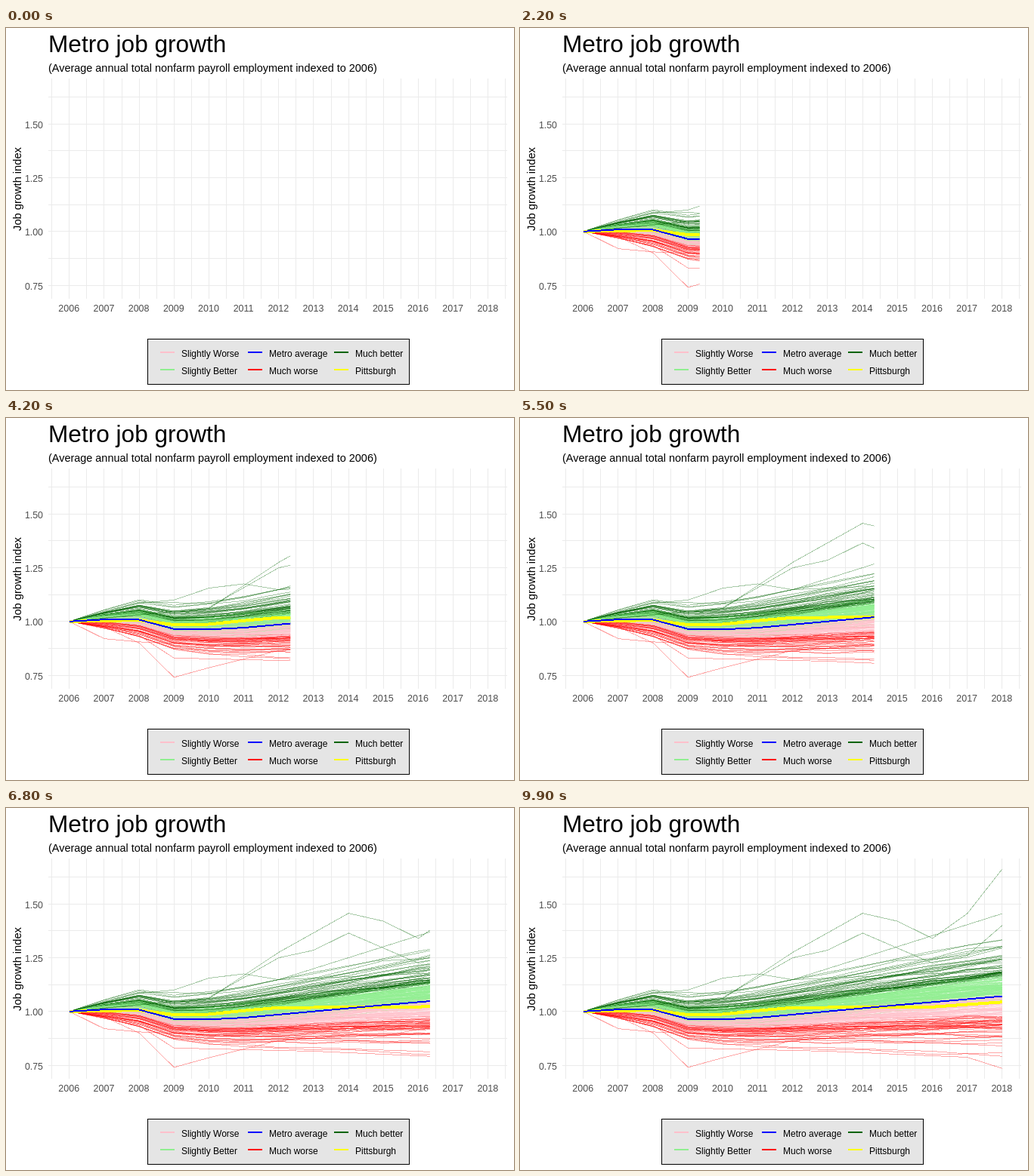
Write an HTML page that moves like this. It is 672 px wide and 480 px high and loops after 10 s.

```html
<!DOCTYPE html>
<html lang="en">
<head>
<meta charset="utf-8">
<title>Metro job growth</title>
<style>
  html, body { margin: 0; width: 100%; height: 100%; overflow: hidden; background: #fff; }
  svg { display: block; width: 672px; height: 480px; font-family: "Liberation Sans", Arial, sans-serif; }
  .crisp { shape-rendering: crispEdges; fill: none; }
</style>
</head>
<body>
<svg id="stage" viewBox="0 0 672 480">
  <defs><clipPath id="reveal"><rect id="window" x="83" y="60" width="0" height="300"/></clipPath></defs>
</svg>
<script>
const stage = document.getElementById('stage');
const revealWindow = document.getElementById('window');
const YEARS = 12, STEP_MS = 100, STEPS = 100, LAST_STEP = 79;
const xOf = year => 83.78 + year * 46.17;
const yOf = index => 269.8 - (index - 1) * 285;

function add(parent, tag, attrs, text) {
  const node = document.createElementNS('http://www.w3.org/2000/svg', tag);
  for (const key in attrs) node.setAttribute(key, attrs[key]);
  if (text) node.textContent = text;
  parent.appendChild(node);
  return node;
}
const label = (text, x, y, size, attrs) =>
  add(stage, 'text', { x, y, 'font-size': size, fill: '#000', ...attrs }, text);

// Headings, grid and axes
label('Metro job growth', 56, 32, 31.6);
label('(Average annual total nonfarm payroll employment indexed to 2006)', 56, 58, 14.45);
label('Job growth index', 0, 0, 14.67,
  { transform: 'translate(20 213.5) rotate(-90)', 'text-anchor': 'middle' });

const grid = add(stage, 'g', { class: 'crisp', stroke: '#ebebeb' });
const gridLine = d => add(grid, 'path', { d });
for (let half = -1; half <= 25; half++) {
  gridLine(`M${Math.floor(xOf(half / 2)) + .5} 67V359`);
}
for (let index = .75; index < 1.7; index += .125) {
  gridLine(`M56 ${Math.floor(yOf(index)) + .5}H663`);
}
const axis = { fill: '#4d4d4d' };
for (let year = 0; year <= YEARS; year++) {
  label(String(2006 + year), xOf(year) - .5, 376, 12.5, { ...axis, 'text-anchor': 'middle' });
}
for (let index = .75; index <= 1.5; index += .25) {
  label(index.toFixed(2), 49, yOf(index) + 5.5, 12.4, { ...axis, 'text-anchor': 'end' });
}

// Legend
add(stage, 'rect', { x: 187.5, y: 412.5, width: 346, height: 60, fill: '#e5e5e5', stroke: '#000' });
[
  ['Slightly Worse', 'pink'], ['Slightly Better', 'lightgreen'],
  ['Metro average', 'blue'], ['Much worse', 'red'],
  ['Much better', 'darkgreen'], ['Pittsburgh', 'yellow']
].forEach(([name, stroke], i) => {
  const x = [204, 320, 434][i >> 1], y = 430 + 23 * (i % 2);
  add(stage, 'path', { d: `M${x} ${y}h19`, stroke, 'stroke-width': 2, class: 'crisp' });
  label(name, x + 28, y + 6, 12);
});

// Series are functions of the year, giving thousandths above or below 1
const plot = add(stage, 'g', {
  class: 'crisp', 'clip-path': 'url(#reveal)', 'stroke-linejoin': 'round'
});
function series(valueAt, stroke, width = 1, opacity = .34) {
  const points = Array.from({ length: YEARS + 1 }, (_, year) =>
    `${xOf(year).toFixed(1)},${yOf(1 + valueAt(year) / 1000).toFixed(1)}`);
  add(plot, 'polyline', {
    points: points.join(' '), stroke, 'stroke-width': width, 'stroke-opacity': opacity
  });
}

// Straight lines from the common start through a few [year, value] turning points
const through = (...turns) => year => {
  let [fromYear, from] = [0, 0];
  for (const [toYear, to] of turns) {
    if (year <= toYear) return from + (to - from) * (year - fromYear) / (toYear - fromYear);
    [fromYear, from] = [toYear, to];
  }
};
const average = through([1, 9], [2, 8], [3, -35], [4, -37], [5, -29], [9, 30], [12, 71]);
const pittsburgh = through([2, 6], [3, -15], [4, -13], [5, 4], [6, 18], [10, 21], [12, 44]);
const boom = through([4, 60], [6, 275], [8, 457], [9, 420], [10, 340], [11, 455], [12, 662]);
const surge = through([4, 65], [6, 250], [7, 285], [8, 365], [10, 225], [11, 260], [12, 400]);
const peak = through([2, 85], [3, 100], [4, 155], [5, 175], [6, 148], [12, 190]);
const climb = through([2, 90], [4, 85], [6, 148], [12, 455]);
const crash = through([1, -25], [2, -100], [3, -260], [4, -215], [6, -135], [12, -85]);
const slump = through([1, -80], [2, -95], [7, -125], [12, -160]);
const decline = through([2, -65], [3, -170], [7, -185], [11, -213], [12, -265]);

let seed = 2006;
const random = () => (seed = (seed * 16807) % 2147483647) / 2147483647;
function normal() {
  const z = Math.sqrt(-2 * Math.log(random())) * Math.cos(2 * Math.PI * random());
  return Math.max(-2.9, Math.min(2.9, z));
}
const EXTREME = 1.2;
const spread = year => 13.5 * Math.min(year, 2) + 5.1 * Math.max(year - 2, 0);
const stretchTail = z => z + Math.sign(z) * .4 * Math.max(Math.abs(z) - EXTREME, 0);

// Each metro drifts from an early standing to its final one around the average
function drawMetro() {
  const final = normal(), early = normal();
  const better = final > 0, extreme = Math.abs(final) > EXTREME;
  const color = extreme ? (better ? 'darkgreen' : 'red') : (better ? 'lightgreen' : 'pink');
  series(year => {
    const turn = .55 * (1 - year / YEARS);
    const standing = stretchTail(final) * Math.cos(turn) + early * Math.sin(turn) + .08 * normal();
    return average(year) + spread(year) * standing;
  }, color);
}
for (let i = 0; i < 370; i++) drawMetro();
[boom, surge, peak, climb].forEach(path => series(path, 'darkgreen'));
[crash, slump, decline].forEach(path => series(path, 'red'));
series(pittsburgh, 'yellow', 4, 1);
series(average, 'blue', 2, 1);

// Every year is reached on a whole step; the reveal is linear in between
const stepOf = year => Math.round(LAST_STEP * year / YEARS);
function yearAt(step) {
  if (step >= LAST_STEP) return YEARS;
  let year = 0;
  while (stepOf(year + 1) <= step) year++;
  return year + (step - stepOf(year)) / (stepOf(year + 1) - stepOf(year));
}

let shown = -1;
function draw(time) {
  const step = Math.floor(time / STEP_MS) % STEPS;
  if (step !== shown) {
    shown = step;
    revealWindow.setAttribute('width', step && xOf(yearAt(step)) - 83);
  }
}
const start = performance.now();
function tick() {
  draw(performance.now() - start);
  requestAnimationFrame(tick);
}
tick();
</script>
</body>
</html>
```
